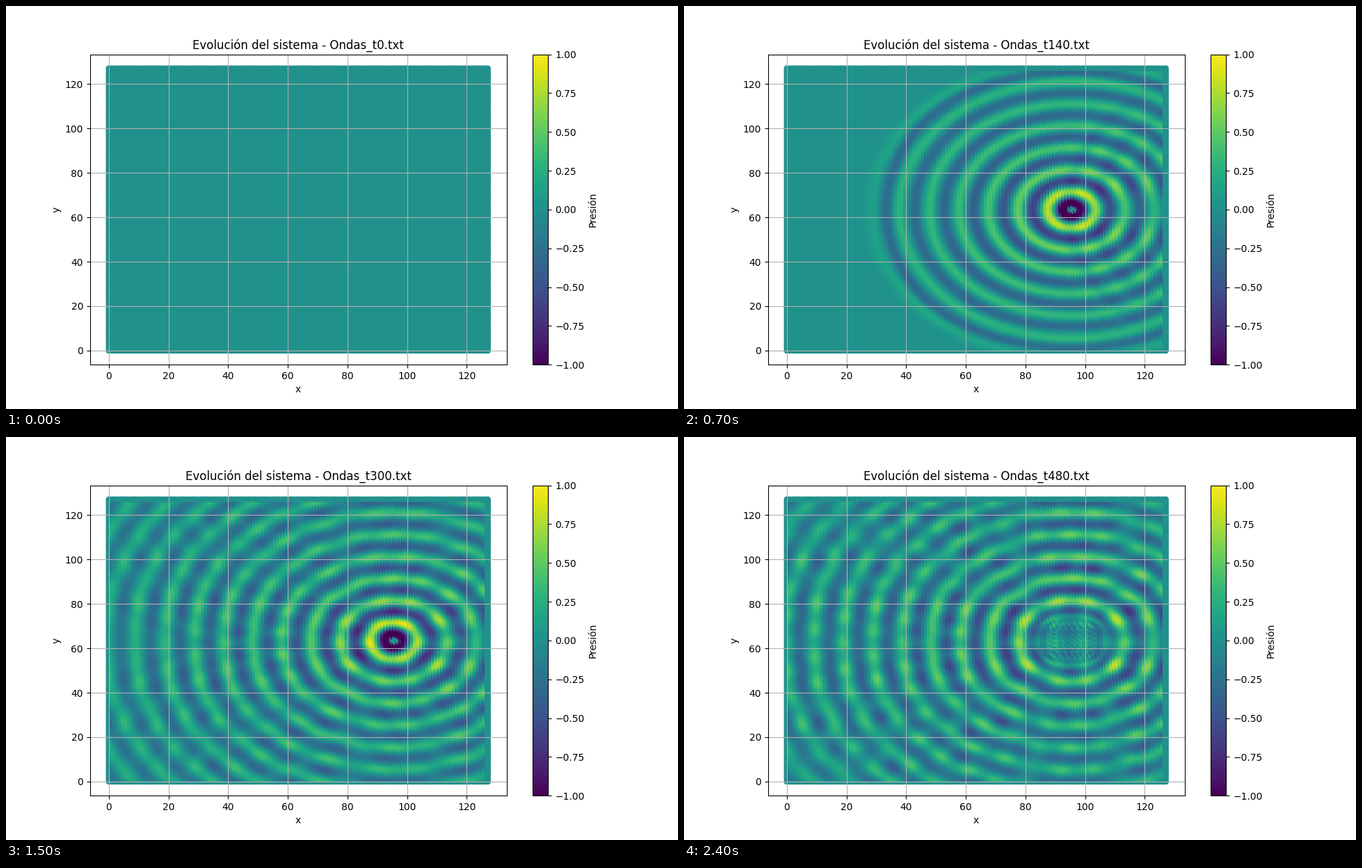
Write a matplotlib script that moves like this. It is 966 px wide and 580 px high and loops after 2.5 s.

```python
import numpy as np
import matplotlib.pyplot as plt
from matplotlib.animation import FuncAnimation

# Lattice Boltzmann (D2Q5) simulation of acoustic waves
N = 128
C = 0.5                       # wave speed
OMEGA = 2 * np.pi / 10 * C    # wavelength of 10 cells
AMPLITUDE = 10
SOURCE = (96, 64)
SOURCE_OFF = 450
STEP = 20
FRAMES = 25
VELOCITIES = [(0, 0), (1, 0), (0, 1), (-1, 0), (0, -1)]


def equilibrium(rho, jx, jy):
    rest = (1 - 2 * C**2) * rho
    moving = [0.5 * (C**2 * rho + vx * jx + vy * jy) for vx, vy in VELOCITIES[1:]]
    return np.array([rest] + moving)


def simulate():
    f = np.zeros((5, N, N))
    fields = []
    for t in range(STEP * (FRAMES - 1) + 1):
        rho, jx, jy = f.sum(axis=0), f[1] - f[3], f[2] - f[4]
        new = 2 * equilibrium(rho, jx, jy) - f
        # border cells send nothing back, so walls absorb most of the wave
        new[:, [0, -1], :] = 0
        new[:, :, [0, -1]] = 0
        if t < SOURCE_OFF:
            pulse = AMPLITUDE * np.sin(OMEGA * t)
            new[(slice(None), *SOURCE)] = equilibrium(pulse, jx[SOURCE], jy[SOURCE])
        if t % STEP == 0:
            fields.append(new.sum(axis=0).ravel())
        f = np.array([np.roll(g, v, axis=(0, 1)) for g, v in zip(new, VELOCITIES)])
    return fields


fields = simulate()
x, y = np.indices((N, N)).reshape(2, -1)

plt.rcParams["font.family"] = "DejaVu Sans"
fig, ax = plt.subplots(figsize=(9.66, 5.8), dpi=100)
dots = ax.scatter(x, y, c=fields[0], s=42, linewidths=0, cmap="viridis", vmin=-1, vmax=1)
fig.colorbar(dots, ax=ax, label="Presión")
ax.set_xlabel("x")
ax.set_ylabel("y")
ax.grid(True)
title = ax.set_title("")


def update(i):
    dots.set_array(fields[i])
    title.set_text(f"Evolución del sistema - Ondas_t{i * STEP}.txt")
    return dots, title


anim = FuncAnimation(fig, update, frames=FRAMES, interval=100, repeat=True, repeat_delay=0)
plt.show()
```
